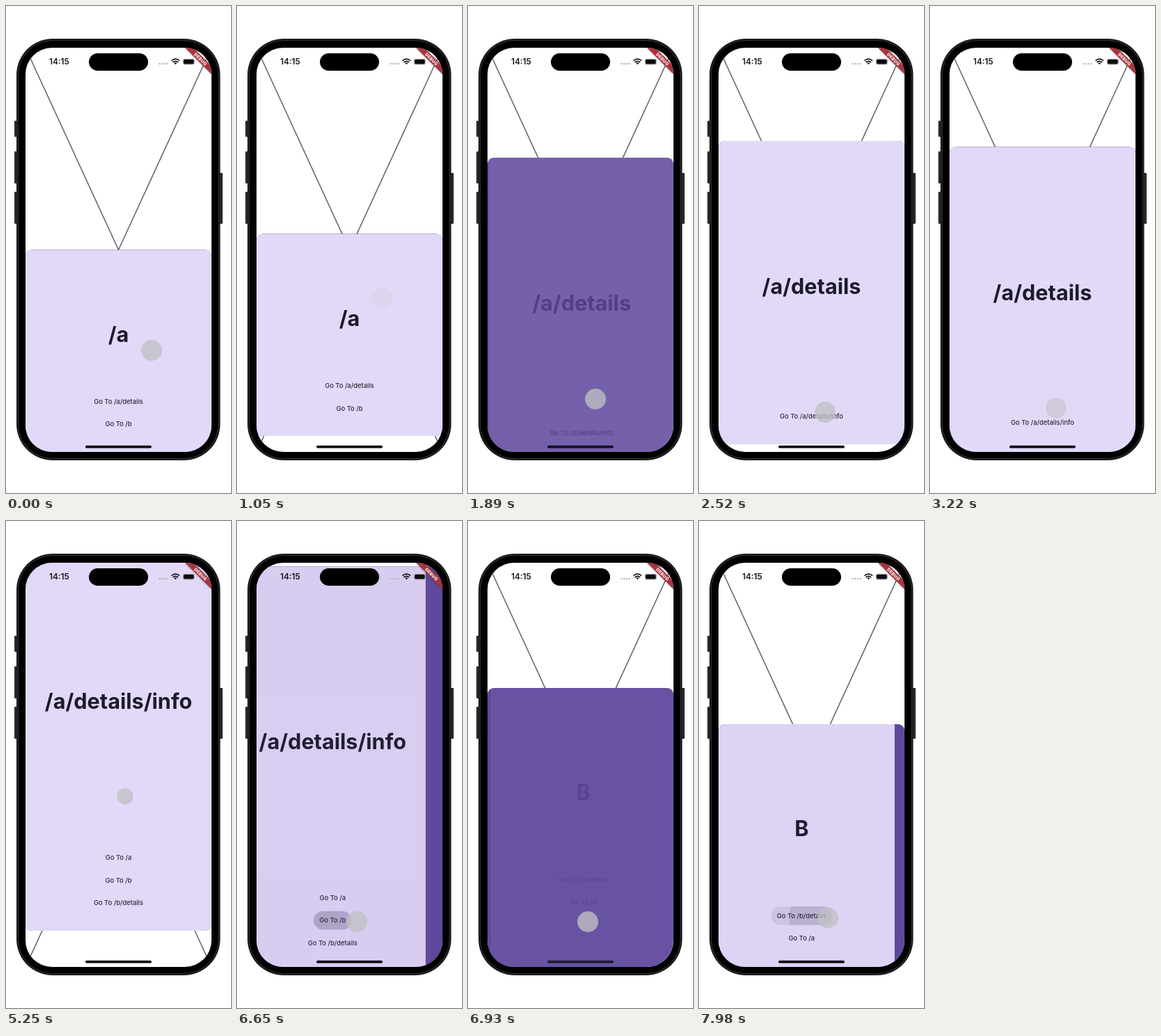
An HTML page that plays this animation: 323x700 px, repeating every 8 s.

```html
<!DOCTYPE html>
<html lang="en">
<head>
<meta charset="utf-8">
<title>Sheet navigation</title>
<style>
html, body { margin: 0; width: 100%; height: 100%; overflow: hidden; background: #fff; }
svg { display: block; width: 323px; height: 700px; font-family: Inter, Roboto, sans-serif; }
.title { font-size: 30.6px; font-weight: 700; fill: #1d1a2b; text-anchor: middle; }
.btn { font-size: 9.4px; font-weight: 500; fill: #2c2839; text-anchor: middle; }
</style>
</head>
<body>
<svg viewBox="0 0 323 700">
  <defs>
    <clipPath id="screen"><rect x="28" y="60" width="267" height="581" rx="38"/></clipPath>
    <clipPath id="sheetClip"><rect id="sheetRect" x="28" width="267" rx="9"/></clipPath>
    <filter id="soft" x="-30%" y="-30%" width="160%" height="160%"><feGaussianBlur stdDeviation="1.6"/></filter>
  </defs>
  <g fill="#2b2b2b">
    <rect x="12" y="165" width="6" height="23" rx="1"/>
    <rect x="12" y="209" width="6" height="46" rx="1"/>
    <rect x="12" y="267" width="6" height="46" rx="1"/>
    <rect x="305" y="240" width="6" height="73" rx="1"/>
  </g>
  <rect x="15" y="47" width="292.500" height="606" rx="52" fill="#1b1b1b"/>
  <rect x="17.500" y="49.500" width="287.500" height="601" rx="49.500" stroke="#303030"/>
  <g clip-path="url(#screen)">
    <rect x="28" y="60" width="267" height="581" fill="#fff"/>
    <path d="M28 60L295 641M295 60L28 641" stroke="#5d6373" stroke-width="1.500"/>
    <g clip-path="url(#sheetClip)">
      <rect x="28" y="0" width="267" height="700" fill="#5e479b"/>
      <g id="pages"></g>
    </g>
    <text x="62" y="84.300" font-size="11.800" font-weight="600" fill="#17161c">14:15</text>
    <g fill="#b5b3bd">
      <circle cx="220.500" cy="83" r="1.200"/><circle cx="224.200" cy="83" r="1.200"/>
      <circle cx="227.900" cy="83" r="1.200"/><circle cx="231.600" cy="83" r="1.200"/>
    </g>
    <g fill="none" stroke="#111" stroke-width="1.700">
      <path d="M237.500 78.600Q243.300 73.800 249.100 78.600M239.500 81Q243.300 77.800 247.100 81"/>
      <path d="M241.300 82L243.300 84.300L245.300 82Q243.300 80.700 241.300 82Z" fill="#111" stroke="none"/>
    </g>
    <rect x="253.800" y="75.800" width="17" height="8.600" rx="2.800" fill="#a5a3ab"/>
    <rect x="255" y="77" width="14.600" height="6.200" rx="1.800" fill="#0c0c0e"/>
    <path d="M257 60H268.600L295 86.400V98Z" fill="#000" opacity=".4" filter="url(#soft)"/>
    <path d="M257 60H268.600L295 86.400V98Z" fill="#a9343d"/>
    <text transform="translate(279.300 76.500) rotate(45)" y="2.200" font-size="6.200" font-weight="800"
      fill="#fff" text-anchor="middle" letter-spacing=".3">DEBUG</text>
    <rect id="home" x="114" y="631.700" width="95" height="3.800" rx="1.900" fill="#0d0a14"/>
  </g>
  <rect x="119" y="68" width="85" height="25" rx="12.500"/>
  <circle id="touch" fill="#bfc0c3"/>
</svg>
<script>
const NS = 'http://www.w3.org/2000/svg', LOOP = 8000, MID = 161.5, BOTTOM = 641, MOVE = 500;
const $ = id => document.getElementById(id);
const clamp = x => Math.max(0, Math.min(1, x));

function set(node, attrs) {
  for (const k in attrs) node.setAttribute(k, attrs[k]);
  return node;
}
function add(parent, tag, attrs, text) {
  const node = set(document.createElementNS(NS, tag), attrs);
  if (text) node.textContent = text;
  return parent.appendChild(node);
}

function bezier(x1, y1, x2, y2) {
  const at = (a, b, u) => 3 * (1 - u) * (1 - u) * u * a + 3 * (1 - u) * u * u * b + u * u * u;
  return x => {
    let lo = 0, hi = 1;
    for (let i = 0; i < 24; i++) {
      const u = (lo + hi) / 2;
      if (at(x1, x2, u) < x) lo = u; else hi = u;
    }
    return at(y1, y2, lo);
  };
}
const easeInOut = bezier(.42, 0, .58, 1);
const easeIn = bezier(.42, 0, 1, 1);
const easeInExpo = bezier(.95, .05, .795, .035);
const slideStart = bezier(.283, .044, .545, .57);
const slideEnd = bezier(.209, 1, .4345, .976);
const slide = t => t < .198 ? .541 * slideStart(t / .198) : .541 + .459 * slideEnd((t - .198) / .802);

// Smooth value through [time, value] keys
function track(keys, t) {
  if (t <= keys[0][0]) return keys[0][1];
  for (let i = 1; i < keys.length; i++) {
    const [t0, a] = keys[i - 1], [t1, b] = keys[i];
    if (t < t1) {
      const u = (t - t0) / (t1 - t0);
      return a + (b - a) * u * u * (3 - 2 * u);
    }
  }
  return keys[keys.length - 1][1];
}

const pages = [
  { top: 350.5, title: '/a', gap: 121.5, links: ['/a/details', '/b'] },
  { top: 205, title: '/a/details', gap: 209.5, links: ['/a/details/info'] },
  { top: 60, title: '/a/details/info', gap: 251, links: ['/a', '/b', '/b/details'] },
  { top: 293, title: 'B', gap: 149.5, links: ['/b/details', '/a'] },
  { top: 205, title: '/b/details', gap: 209.5, links: ['/a'] }
];
const moves = [1495, 3810, 6596, 7943];

const drag = [
  [0, 0], [350, 26], [750, -38], [900, -38], [1250, 0], [2400, 0], [2750, -40], [3100, -6],
  [3220, -2.5], [3420, 0], [4600, 0], [4950, -60], [5250, -52], [5550, -22], [5800, 6], [6200, 0]
];

const touches = [
  { from: -200, to: 850, x: 209, y: [[0, 495], [350, 545], [750, 420]] },
  { from: 1330, to: 1960, x: 183, y: [[0, 565]], page: 0, link: 0 },
  { from: 2350, to: 3130, x: 181, y: [[2400, 610], [2750, 515], [3100, 578]] },
  { from: 3650, to: 4220, x: 182, y: [[0, 605]], page: 1, link: 0 },
  { from: 4570, to: 4980, x: 171, y: [[4600, 520], [4950, 390]] },
  { from: 5235, to: 5760, x: 171, y: [[5260, 396], [5750, 480]] },
  { from: 6290, to: 7220, x: 172, y: [[0, 576]], page: 2, link: 1 },
  { from: 7890, to: 8200, x: 185, y: [[0, 570.5]], page: 3, link: 0 }
];

pages.forEach((p, n) => {
  const h = BOTTOM - p.top;
  p.node = add($('pages'), 'g', {});
  add(p.node, 'rect', { x: 28, width: 267, height: 640, fill: '#e2d9f8' });
  add(p.node, 'text', { class: 'title', x: MID, y: p.gap + 11 }, p.title);
  p.links.forEach((path, i) => {
    const y = h - 40 - 32.6 * (p.links.length - 1 - i);
    const label = document.createElementNS(NS, 'text');
    set(label, { class: 'btn', x: MID, y: y + 3.4 }).textContent = 'Go To ' + path;
    const tap = touches.find(t => t.page === n && t.link === i);
    if (tap) {
      p.node.appendChild(label);
      const w = label.getComputedTextLength() + 16.5;
      const pill = { x: MID - w / 2, y: y - 13.3, width: w, height: 26.6, rx: 13.3 };
      add(add(p.node, 'clipPath', { id: 'pill' + n }), 'rect', pill);
      tap.pill = add(p.node, 'rect', { ...pill, fill: '#2a2238' });
      tap.ink = add(p.node, 'circle', {
        cx: tap.x + 2, cy: tap.y[0][1] - p.top, fill: '#2a2238', 'clip-path': `url(#pill${n})`
      });
    }
    p.node.appendChild(label);
  });
});

function draw(t) {
  let n = 0;
  while (n < moves.length && t >= moves[n] + MOVE) n++;
  const u = n < moves.length ? clamp((t - moves[n]) / MOVE) : 1;
  const next = Math.min(n + 1, pages.length - 1);
  const off = track(drag, t);
  const top = pages[n].top + (pages[next].top - pages[n].top) * easeInOut(u) + off;
  const end = off > -6 ? BOTTOM : BOTTOM + off;
  set($('sheetRect'), { y: top, height: end - top });

  pages.forEach((p, i) => {
    let x = 0, alpha = 0;
    if (i === n) {
      x = -89 * slide(u);
      alpha = 1 - easeIn(clamp(u * 2));
    } else if (i === next && u > 0) {
      x = 267 * (1 - slide(u));
      alpha = easeInExpo(u);
    }
    set(p.node, { transform: `translate(${x} ${top})`, opacity: alpha });
  });
  set($('home'), { opacity: 1 - .4 * Math.sin(Math.PI * u) ** 4 });

  let shown = { r: 0 };
  for (const c of touches) {
    const age = t - c.from;
    if (age >= 0 && t < c.to + 260) {
      shown = {
        cx: c.x, cy: track(c.y, t), r: 11 + 4 * clamp(age / 80),
        opacity: .79 * (1 - clamp((t - c.to) / 260))
      };
    }
    if (c.pill) {
      const on = age >= 0 ? 1 : 0;
      set(c.pill, { opacity: on * (.06 + .08 * clamp(age / 300)) });
      set(c.ink, { opacity: on * .11, r: 36 + 30 * clamp(age / 350) });
    }
  }
  set($('touch'), shown);
}

function tick() {
  draw(performance.now() % LOOP);
  requestAnimationFrame(tick);
}
tick();
</script>
</body>
</html>
```
